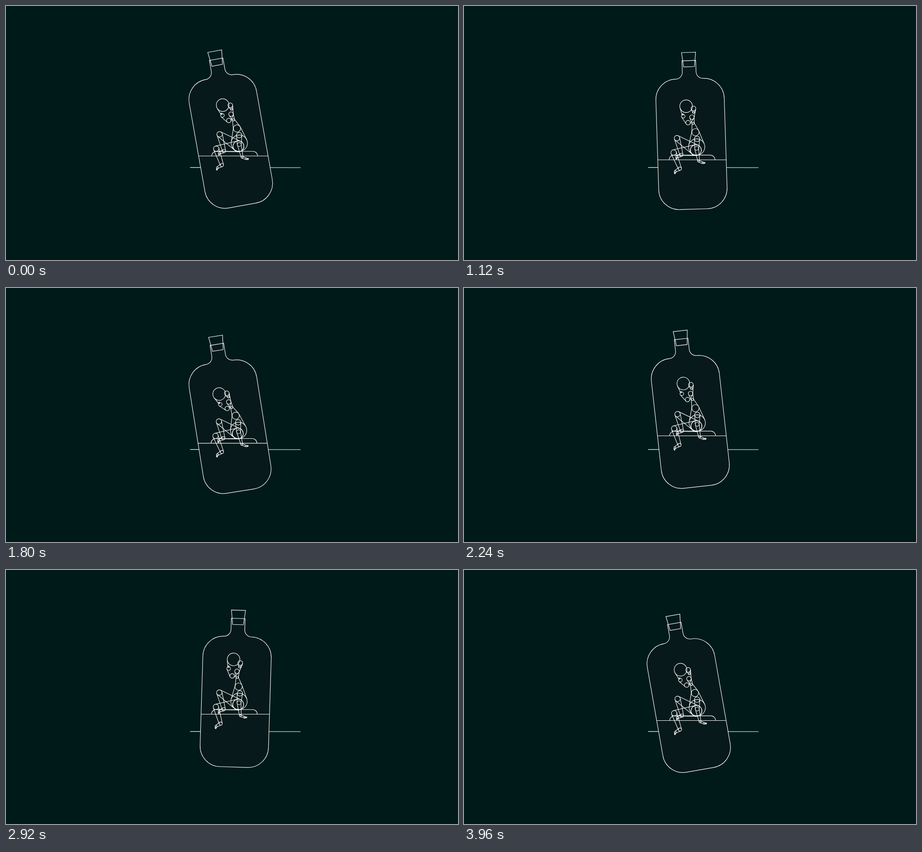
An HTML page with a canvas that plays this animation: 998 px wide and 561 px high, repeating every 4000 ms.

```html
<!DOCTYPE html>
<html lang="en">
<head>
<meta charset="utf-8">
<title>Adrift in a bottle</title>
<style>
  html, body { margin: 0; width: 100%; height: 100%; overflow: hidden; background: #001a1a; }
  canvas { display: block; width: 100vw; height: 100vh; }
</style>
</head>
<body>
<canvas id="stage" width="998" height="561"></canvas>
<script>
const ctx = document.getElementById('stage').getContext('2d');
const RAD = Math.PI / 180;
const WAVE = 2000, LOOP = 2 * WAVE;

// Each wave lifts the bottle from rest to its crest and drops it into a trough.
// Tilt, height and water turn at `at`; sideways drift and lean follow at `late`.
const rest = { at: 0, late: 0, x: 506.4, y: 356.1, tilt: -10.1, water: 331.3, lean: 20.9 };
const crest = { at: 850, late: 930, x: 505.3, y: 347, tilt: 3.2, water: 314.2, lean: 5.8 };
const deep = { at: 1400, late: 1600, x: 501.1, y: 379, tilt: -7, water: 366, lean: 29.2 };
const shallow = { at: 1420, late: 1560, x: 505.5, y: 364.6, tilt: -8.3, water: 349, lean: 22.6 };

const mix = (a, b, p) => a + (b - a) * p;

function pose(t, key, clock) {
  const trough = t < WAVE ? deep : shallow;
  const stops = [rest, crest, trough, { ...rest, [clock]: WAVE }];
  const now = t % WAVE;
  const i = stops.findIndex(s => s[clock] > now);
  const a = stops[i - 1], b = stops[i];
  return mix(a[key], b[key], (now - a[clock]) / (b[clock] - a[clock]));
}

function bottlePath() {
  const p = new Path2D();
  p.moveTo(-15.2, -242.3);
  p.lineTo(-15.2, -217.5);
  p.arc(-30.5, -217.5, 15.3, 0, Math.PI / 2);
  p.arcTo(-75.5, -202.2, -75.5, -157, 45);
  p.arcTo(-75.5, 86, -30.5, 86, 45);
  p.arcTo(75.5, 86, 75.5, 41, 45);
  p.arcTo(75.5, -202.2, 30.5, -202.2, 45);
  p.arc(30.5, -217.5, 15.3, Math.PI / 2, Math.PI);
  p.lineTo(15.2, -242.3);
  p.closePath();
  return p;
}
const bottle = bottlePath();
const cork = new Path2D('M-15.6-260.4H15.6L11.9-228.7H-11.9Z');
const raft = new Path2D('M-59 0A10.3 10.3 0 0 1-48.7-10.3H31.9A10.3 10.3 0 0 1 42.2 0');

function line(x1, y1, x2, y2) {
  ctx.beginPath();
  ctx.moveTo(x1, y1);
  ctx.lineTo(x2, y2);
  ctx.stroke();
}

function ring([x, y, r]) {
  ctx.beginPath();
  ctx.arc(x, y, r, 0, 2 * Math.PI);
  ctx.stroke();
}

// One outer tangent of two circles; side is -1 or 1
function tangent(a, b, side) {
  const dx = b[0] - a[0], dy = b[1] - a[1];
  const angle = Math.atan2(dy, dx) + side * Math.acos((a[2] - b[2]) / Math.hypot(dx, dy));
  const c = Math.cos(angle), s = Math.sin(angle);
  line(a[0] + a[2] * c, a[1] + a[2] * s, b[0] + b[2] * c, b[1] + b[2] * s);
}

function chain(...joints) {
  joints.forEach((joint, i) => {
    ring(joint);
    if (!i) return;
    tangent(joints[i - 1], joint, -1);
    tangent(joints[i - 1], joint, 1);
  });
}

// A circle at a distance from a joint; 0 degrees points down, positive turns right
function hang(from, length, degrees, r) {
  const a = degrees * RAD;
  return [from[0] + length * Math.sin(a), from[1] + length * Math.cos(a), r];
}
const rise = (from, length, degrees, r) => hang(from, -length, degrees, r);

function drawHead(neck, lean) {
  const skull = [-18.5, -20, 14], ear = [-1.6, -19.5, 5.2];
  const nose = [-19, 3, 4], tip = [-21.2, -0.6, 1.6];
  const chin = [-5, 14, 5], nape = [0, 0, 5];
  ctx.save();
  ctx.translate(neck[0], neck[1]);
  ctx.rotate((20.9 - lean) * 1.78 * RAD);
  [skull, nose, tip, chin].forEach(ring);
  chain(ear, [1.2, -10.8, 2]);
  tangent(skull, tip, 1);
  tangent(nose, chin, 1);
  tangent(chin, nape, 1);
  tangent(ear, nape, -1);
  ctx.restore();
}

function drawLeg(hip, knee, swing, footDrop) {
  const ankle = hang(knee, 38.2, swing, 3.5);
  const [x, y] = ankle;
  chain(hip, knee, ankle, [x - 10.3, y + footDrop, 2], [x - 11.2, y + footDrop + 4.5, 1]);
}

function drawArm(lean) {
  const shoulder = [4.6 - 0.15 * lean, -24.8, 6], elbow = [1.8, -4, 4.3];
  const wrist = hang(elbow, 28.6, 3.4 + 0.43 * lean, 2);
  const [x, y] = wrist;
  chain(shoulder, elbow, wrist, [x + 9.5, y + 4, 1.6], [x + 13.5, y + 3.9, 1]);
}

function drawPerson(lean, swing) {
  const hip = [0, 0, 12], belly = [1.8, -7, 18];
  drawLeg(hip, [-41.7, -26.5, 6], 15, 4.2);
  drawLeg(hip, [-49.2, 5.3, 6], swing, 6);

  const chest = rise(hip, 39.6, 0.41 * lean - 3.8, 8);
  const nape = rise(chest, 20.4, 0.92 * lean + 3, 2.4);
  const neck = rise(nape, 13.8, 1.4 * lean - 6, 5);
  chain(belly, chest, nape, neck);
  drawHead(neck, lean);
  drawArm(lean);
}

function draw(t) {
  const x = pose(t, 'x', 'late'), lean = pose(t, 'lean', 'late');
  const y = pose(t, 'y', 'at'), tilt = pose(t, 'tilt', 'at');
  const water = pose(t, 'water', 'at');
  const hipX = 513.3 + 0.6 * (x - rest.x);
  const swing = 19.4 + 0.25 * (water - rest.water);

  ctx.fillStyle = '#001a1a';
  ctx.fillRect(0, 0, 998, 561);
  ctx.strokeStyle = '#fff';
  ctx.lineWidth = 1.15;
  line(406.5, 356.6, 650.3, 357);

  const place = new DOMMatrix().translate(x, y).rotate(tilt);
  const outline = new Path2D(), stopper = new Path2D();
  outline.addPath(bottle, place);
  stopper.addPath(cork, place);
  ctx.fillStyle = '#07191a';
  ctx.fill(outline);

  ctx.save();
  ctx.clip(outline);
  line(380, water, 620, water);
  ctx.restore();

  ctx.save();
  ctx.translate(hipX, water);
  ctx.stroke(raft);
  ctx.translate(0, -21.4);
  drawPerson(lean, swing);
  ctx.restore();

  ctx.stroke(outline);
  ctx.stroke(stopper);
}

const start = performance.now();
function tick() {
  draw((performance.now() - start) % LOOP);
  requestAnimationFrame(tick);
}
tick();
</script>
</body>
</html>
```
